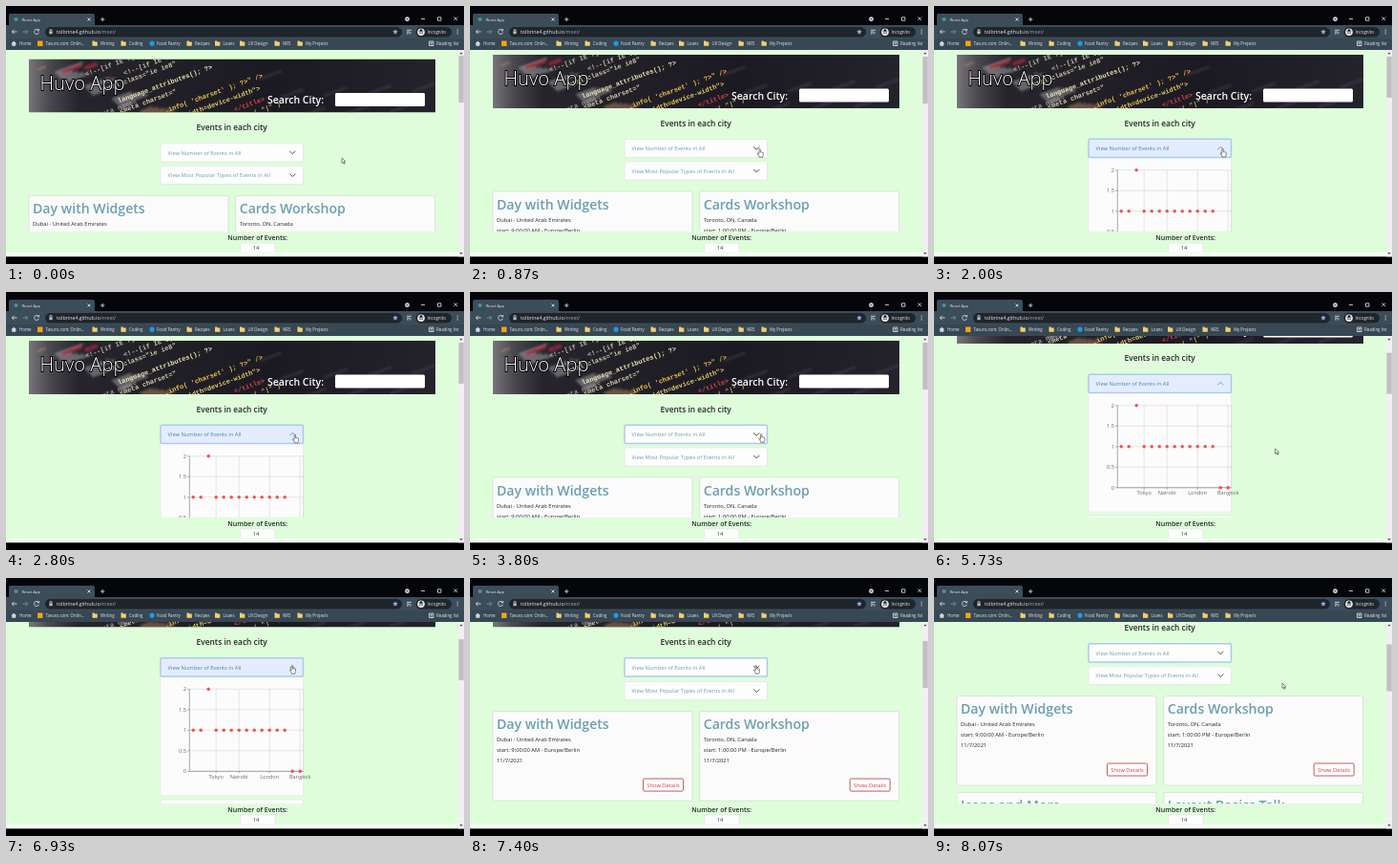
These frames come from a looping animation (480 px wide and 270 px high, 8140 ms). An HTML page:

```html
<!DOCTYPE html>
<html lang="en">
<head>
<meta charset="utf-8">
<title>Event app demo</title>
<style>
  html, body { margin: 0; width: 100%; height: 100%; overflow: hidden; background: #000; }
  svg { display: block; width: 480px; height: 270px; }
  text { font-family: "Open Sans", "Noto Sans", sans-serif; font-size: 5.75px; fill: #212529; }
  .tiny { font-size: 4.4px; fill: #e8eaed; }
  .strong { font-weight: 600; }
  .mid { text-anchor: middle; }
  .end { text-anchor: end; }
  .code { font: bold 7px "Liberation Mono", monospace; }
  .title { font-size: 14.1px; font-weight: 600; fill: #6b9fb1; }
  .link { fill: #6b9fb1; }
  .tick { font-size: 5.6px; fill: #666; }
  .line { fill: none; stroke: #e8eaed; stroke-width: .8; }
  .box { fill: #fdfdfd; stroke: #d5ddd5; stroke-width: .5; }
</style>
</head>
<body>
<svg viewBox="0 0 480 270">
  <defs>
    <clipPath id="pageClip"><rect y="46" width="474" height="190"/></clipPath>
    <clipPath id="bodyClip"><rect id="bodyWindow" x="160" y="163" width="170"/></clipPath>
    <clipPath id="bannerClip"><rect width="426" height="56"/></clipPath>
    <linearGradient id="photo">
      <stop offset="0" stop-color="#77757a"/>
      <stop offset=".05" stop-color="#4a494f"/>
      <stop offset=".12" stop-color="#26252c"/>
      <stop offset=".6" stop-color="#1b1a22"/>
      <stop offset="1" stop-color="#24232c"/>
    </linearGradient>
    <filter id="soft"><feGaussianBlur stdDeviation="1.1"/></filter>
  </defs>

  <rect y="46" width="480" height="212" fill="#dffddb"/>

  <g clip-path="url(#pageClip)">
    <g id="page">
      <g transform="translate(24 55.5)" clip-path="url(#bannerClip)">
        <rect width="426" height="56" fill="url(#photo)"/>
        <g id="streaks" filter="url(#soft)"></g>
        <g id="snippets"></g>
        <text x="11.5" y="32" style="font-size:20.2px;font-weight:300;fill:#fff;stroke:#000;stroke-width:1.8;paint-order:stroke">Huvo App</text>
        <text class="strong" x="250" y="46.5" style="font-size:10.5px;fill:#fff">Search City:</text>
        <rect x="321" y="35.5" width="94" height="14" rx="1.5" fill="#fff"/>
      </g>
      <text class="strong mid" x="236.7" y="130" style="font-size:8.4px">Events in each city</text>

      <g id="below">
        <rect class="box" x="162" y="167.3" width="149.5" height="19.2" rx="1.5"/>
        <text class="link" x="169.5" y="179">View Most Popular Types of Events in All</text>
        <path d="M297.3 175.5l3 3 3-3" class="line" style="stroke:#212529"/>
        <g id="cards"></g>
      </g>

      <g clip-path="url(#bodyClip)">
        <rect x="162" y="163" width="149.5" height="124.5" fill="#fcfcfc" stroke="#dde3dd" stroke-width=".5"/>
        <g id="chart"></g>
      </g>
      <rect id="header" x="162" y="143.7" width="149.5" height="19.3" rx="1.5"/>
      <text id="headerText" x="169.5" y="155.5">View Number of Events in All</text>
      <path id="chevron" d="M-3-1.5l3 3 3-3" class="line"/>
    </g>
  </g>

  <text class="strong mid" x="263.7" y="244.6" style="font-size:7px">Number of Events:</text>
  <rect class="box" x="245.5" y="248" width="36.5" height="10" rx="1.5"/>
  <text class="mid" x="262" y="255.3" style="font-size:5.4px">14</text>
  <rect y="258" width="480" height="4.3" fill="#f6fdf5"/>

  <rect x="474" y="46" width="6" height="216.3" fill="#f1f1f1"/>
  <rect id="thumb" x="474.4" width="5.4" fill="#c1c1c1"/>
  <path d="M475.3 50.3l1.7-2 1.7 2zM475.3 258l1.7 2 1.7-2z" fill="#505050"/>

  <g id="browser">
    <rect width="480" height="21" fill="#04060a"/>
    <path d="M1 21q2 0 2-2v-9q0-2 2-2h86q2 0 2 2v9q0 2 2 2z" fill="#3b4d59"/>
    <rect y="20" width="480" height="26" fill="#3b4d59"/>
    <rect y="34" width="480" height="12" fill="#374754"/>
    <circle cx="10.5" cy="14" r="2" fill="#4a90b8"/>
    <text class="tiny" x="16.5" y="15.7" style="font-size:4.2px">React App</text>
    <path class="line" stroke-width=".6" d="M85.5 12.5l3 3m0-3l-3 3M99 14h4.4m-2.2-2.2v4.4M435 13.5h4M469.5 11.5l3.5 3.5m0-3.5l-3.5 3.5M452.5 11.8h3.4v3.4h-3.4z"/>
    <circle cx="420.5" cy="13.7" r="2.4" fill="#d5d7da"/>
    <path d="M419.3 13.2h2.4l-1.2 1.4z" fill="#111"/>
    <path class="line" d="M11.5 27H6.3m2.3-2.3L6.3 27l2.3 2.3"/>
    <path class="line" style="stroke:#8b959c" d="M17.5 27h5.2m-2.3-2.3l2.3 2.3-2.3 2.3"/>
    <path class="line" d="M34 25.4a2.5 2.5 0 1 0 .4 2.4M34.5 24v1.9h-1.9"/>
    <rect x="41" y="22" width="374" height="10.4" rx="5.2" fill="#20252b"/>
    <path d="M45.4 26.4h3.2v2.8h-3.2z" fill="#bdc1c6"/>
    <path class="line" d="M46 26.4v-.9a1 1 0 0 1 2 0v.9"/>
    <text class="tiny" x="53" y="28.9" style="font-size:5.3px">tolbrine4.github.io<tspan fill="#9aa0a6">/meet/</tspan></text>
    <path d="M408 24.2l.8 1.9 2 .1-1.6 1.3.6 2-1.8-1.1-1.8 1.1.6-2-1.6-1.3 2-.1z" fill="#8ab4f8"/>
    <path class="line" d="M420 25.3h5m-5 1.8h3m-3 1.8h2.2m1.7-1.9v2.4"/>
    <rect x="429.5" y="22" width="37.5" height="10.4" rx="5.2" fill="#20252b"/>
    <circle cx="435" cy="27.2" r="3.8" fill="#e8eaed"/>
    <path d="M432.8 26.8h4.4M433.8 26l.5-1.3h1.4l.5 1.3zM433.2 28.5h1.3m1 0h1.3" stroke="#202124" stroke-width=".8"/>
    <text class="tiny" x="441.5" y="28.9" style="font-size:4.5px">Incognito</text>
    <path d="M472.7 24.4h1v1h-1zm0 2.1h1v1h-1zm0 2.1h1v1h-1z" fill="#e8eaed"/>
    <path d="M5.3 39.3l2.9-2.6 2.9 2.6h-.9v2.4H6.2v-2.4z" fill="#d5d7da"/>
    <rect x="33" y="36.5" width="5.5" height="5.5" fill="#f6a21c"/>
    <circle cx="153" cy="39.2" r="2.6" fill="#1d9bd8"/>
    <path class="line" d="M443.5 37h4.5v4.5h-4.5zm1.2 1.5h2.2m-2.2 1.5h2.2"/>
  </g>

  <g id="cursor" stroke="#222" stroke-width=".55" stroke-linejoin="round" fill="#fff">
    <path id="arrow" d="M0 0v5.4l1.3-1.1.9 2 .9-.4-.9-1.9h1.7z"/>
    <path id="hand" d="M-.7.7q0-.9.7-.9t.7.9v2.6q.6-.5 1.1 0 .6-.4 1 .2.9-.2.9.7v1.7q0 1-.6 1.6v1h-3.6v-.9L-2.2 5.1q-.4-.9.5-.9l1 .8z"/>
  </g>
</svg>

<script>
const LOOP = 8140;
const BODY_HEIGHT = 124.5;
const $ = id => document.getElementById(id);

function add(parent, tag, attrs, content = '') {
  const el = document.createElementNS('http://www.w3.org/2000/svg', tag);
  for (const key in attrs) el.setAttribute(key, attrs[key]);
  el.textContent = content;
  return parent.appendChild(el);
}

function drawBanner() {
  const slope = (x, y) => `translate(${x} ${y}) rotate(-20)`;
  const streak = (x, y, width, height, fill, opacity) =>
    add($('streaks'), 'rect', { width, height, fill, opacity, transform: slope(x, y) });
  for (let i = 0; i < 22; i++)
    streak(8 + i * 29 % 118, 10 + i * 13 % 54, 10 + i * 17 % 24, 2.6, i % 4 ? '#b9b6ba' : '#c08d62', .45);
  streak(34, 12, 22, 4, '#b3283c', .8);
  streak(58, 8, 14, 4, '#b3283c', .7);
  for (let i = 0; i < 8; i++)
    streak(240 + i * 23, 20 + i * 19 % 40, 26, 3, '#55505f', .35);

  const snippets = [
    [60, 18, '#b9b2a0', '<!--[if IE 7]>'],
    [100, 17, '#c9bf98', '<!--[if IE 8]><!-->'],
    [76, 35, '#cfc6a6', '<html class="ie ie8"'],
    [94, 46, '#efe6b4', 'language_attributes(); ?>'],
    [96, 57, '#d9cfa6', '<meta charset="'],
    [147, 55, '#f0c154', "info( 'charset' ); ?>\" />"],
    [164, 61, '#e6cb69', 'width=device-width">'],
    [216, 55, '#e23d48', '</title>'],
    [205, 70, '#c9a65c', 'wp_title( "|" )'],
    [128, 65, '#d8b45c', '<?php'],
    [70, 62, '#98929a', '<meta name=']
  ];
  for (const [x, y, fill, code] of snippets)
    add($('snippets'), 'text', { class: 'code', style: `fill:${fill}`, transform: slope(x, y) }, code);
}

function drawCard(x, y, title, place, start) {
  const g = add($('cards'), 'g', { transform: `translate(${x} ${y})` });
  add(g, 'rect', { class: 'box', width: 209, height: 93.5, rx: 1.5, style: 'fill:#fbfbfb;stroke:#c5cec5' });
  add(g, 'text', { class: 'title', x: 4, y: 18.8 }, title);
  add(g, 'text', { x: 4, y: 31.5 }, place);
  add(g, 'text', { x: 4, y: 42.7 }, `start: ${start} - Europe/Berlin`);
  add(g, 'text', { x: 4, y: 53.7 }, '11/7/2021');
  add(g, 'rect', { x: 157.5, y: 70.5, width: 42, height: 13, rx: 1.2, fill: '#fff', stroke: '#b94a50', 'stroke-width': .9 });
  add(g, 'text', { class: 'mid', x: 178.5, y: 79.2, style: 'fill:#dc3545' }, 'Show Details');
}

function drawChart() {
  const chart = $('chart');
  const valueY = v => 262.3 - v * 43;
  const pointX = i => 196.2 + i * 8;
  const line = (x1, y1, x2, y2, stroke) => add(chart, 'line', { x1, y1, x2, y2, stroke, 'stroke-width': .5 });
  for (let v = 0; v <= 2; v += .5) {
    line(192.3, valueY(v), 311.7, valueY(v), '#ccc');
    line(190, valueY(v), 192.3, valueY(v), '#666');
    add(chart, 'text', { class: 'tick end', x: 189, y: valueY(v) + 2 }, v);
  }
  [[3, 'Tokyo'], [6, 'Nairobi'], [10, 'London'], [14, 'Bangkok']].forEach(([i, city]) => {
    line(pointX(i), valueY(2), pointX(i), valueY(0), '#ccc');
    line(pointX(i), valueY(0), pointX(i), valueY(0) + 2, '#666');
    add(chart, 'text', { class: 'tick mid', x: pointX(i), y: 269.6 }, city);
  });
  line(311.7, valueY(2), 311.7, valueY(0), '#ccc');
  line(192.3, valueY(2), 192.3, valueY(0), '#555');
  line(192.3, valueY(0), 311.7, valueY(0), '#555');
  for (let i = 0; i < 15; i++) {
    const value = i === 2 ? 2 : i > 12 ? 0 : 1;
    add(chart, 'circle', { cx: pointX(i), cy: valueY(value), r: 1.75, fill: '#f0524d' });
  }
}

function drawBookmarks() {
  const bookmarks = [[14, 'Home'], [41.5, 'Tavuro.com: Onlin...'], [99, 'Writing', 1], [129, 'Coding', 1],
    [158, 'Food Pantry'], [198, 'Recipes', 1], [227.5, 'Loans', 1], [253.5, 'UX Design', 1],
    [290, 'NRS', 1], [314, 'My Projects', 1], [451, 'Reading list']];
  for (const [x, label, folder] of bookmarks) {
    add($('browser'), 'text', { class: 'tiny', x, y: 40.8 }, label);
    if (folder) add($('browser'), 'path', { d: `M${x - 8.5} 36.6h2l.7.8h2.6v4.4h-5.3z`, fill: '#f4d06f' });
  }
}

const clamp = p => Math.min(1, Math.max(0, p));
const smooth = p => p * p * (3 - 2 * p);
const easeOut = p => 1 - (1 - p) ** 4;
const linear = p => p;

// Keys are [time, ...values]; each segment eases from the previous key.
function track(keys, t, ease) {
  const next = keys.findIndex(k => k[0] > t);
  if (next < 0) return keys[keys.length - 1].slice(1);
  if (next === 0) return keys[0].slice(1);
  const a = keys[next - 1], b = keys[next];
  const p = ease((t - a[0]) / (b[0] - a[0]));
  return a.slice(1).map((v, i) => v + (b[i + 1] - v) * p);
}

const scrollKeys = [[100, 0], [500, 4.5], [5240, 4.5], [6150, 60], [7880, 60]];
const cursorKeys = [[70, 352, 159], [950, 302.5, 149.5], [2600, 302.5, 149.5], [3470, 305.2, 148.8], [4650, 305.2, 148.8],
  [5130, 357.6, 164], [6240, 357.6, 164], [6560, 290, 85], [6730, 299.8, 91.7], [7400, 299.8, 91.7], [7870, 365, 110]];
const toggles = [1200, 2800, 4430, 7070];

function openness(t, duration) {
  let open = 0;
  toggles.forEach((start, i) => {
    const p = smooth(clamp((t - start) / duration));
    if (t >= start) open = i % 2 ? 1 - p : p;
  });
  return open;
}

function draw(t) {
  const scroll = t > 7880 ? track([[7880, 60], [8060, 75]], t, linear)[0] : track(scrollKeys, t, easeOut)[0];
  const body = openness(t, 350) * BODY_HEIGHT;
  const tint = openness(t, 150);
  const focused = t >= toggles[0];

  $('page').setAttribute('transform', `translate(0 ${-scroll})`);
  $('below').setAttribute('transform', `translate(0 ${body})`);
  $('bodyWindow').setAttribute('height', body);
  $('header').style.cssText = `fill:rgb(${253 - 25 * tint},${253 - 16 * tint},253);` +
    (focused ? 'stroke:#a9cbee;stroke-width:1.5' : 'stroke:#d5ddd5;stroke-width:.5');
  $('headerText').style.fill = tint > .5 ? '#3f82c8' : '#6b9fb1';
  $('chevron').setAttribute('transform', `translate(300.3 153.3) rotate(${-180 * openness(t, 200)})`);
  $('chevron').style.stroke = tint > .5 ? '#3f82c8' : '#212529';

  const pageHeight = 867 + body;
  $('thumb').setAttribute('y', 52 + 201 * scroll / pageHeight);
  $('thumb').setAttribute('height', 201 * 212 / pageHeight);

  const [x, y] = track(cursorKeys, t, smooth);
  const pageY = y + scroll;
  const hovering = x > 162 && x < 311.5 && pageY > 143.7 && pageY < 163;
  $('cursor').setAttribute('transform', `translate(${x} ${y})`);
  $('hand').style.display = hovering ? '' : 'none';
  $('arrow').style.display = hovering ? 'none' : '';
}

drawBanner();
drawChart();
drawBookmarks();
drawCard(24, 198.5, 'Day with Widgets', 'Dubai - United Arab Emirates', '9:00:00 AM');
drawCard(240.7, 198.5, 'Cards Workshop', 'Toronto, ON, Canada', '1:00:00 PM');
drawCard(24, 299.5, 'Icons and More', 'Tokyo, Japan', '9:00:00 AM');
drawCard(240.7, 299.5, 'Layout Basics Talk', 'London, UK', '1:00:00 PM');

const begin = performance.now();
function frame() {
  draw((performance.now() - begin) % LOOP);
  requestAnimationFrame(frame);
}
frame();
</script>
</body>
</html>
```
